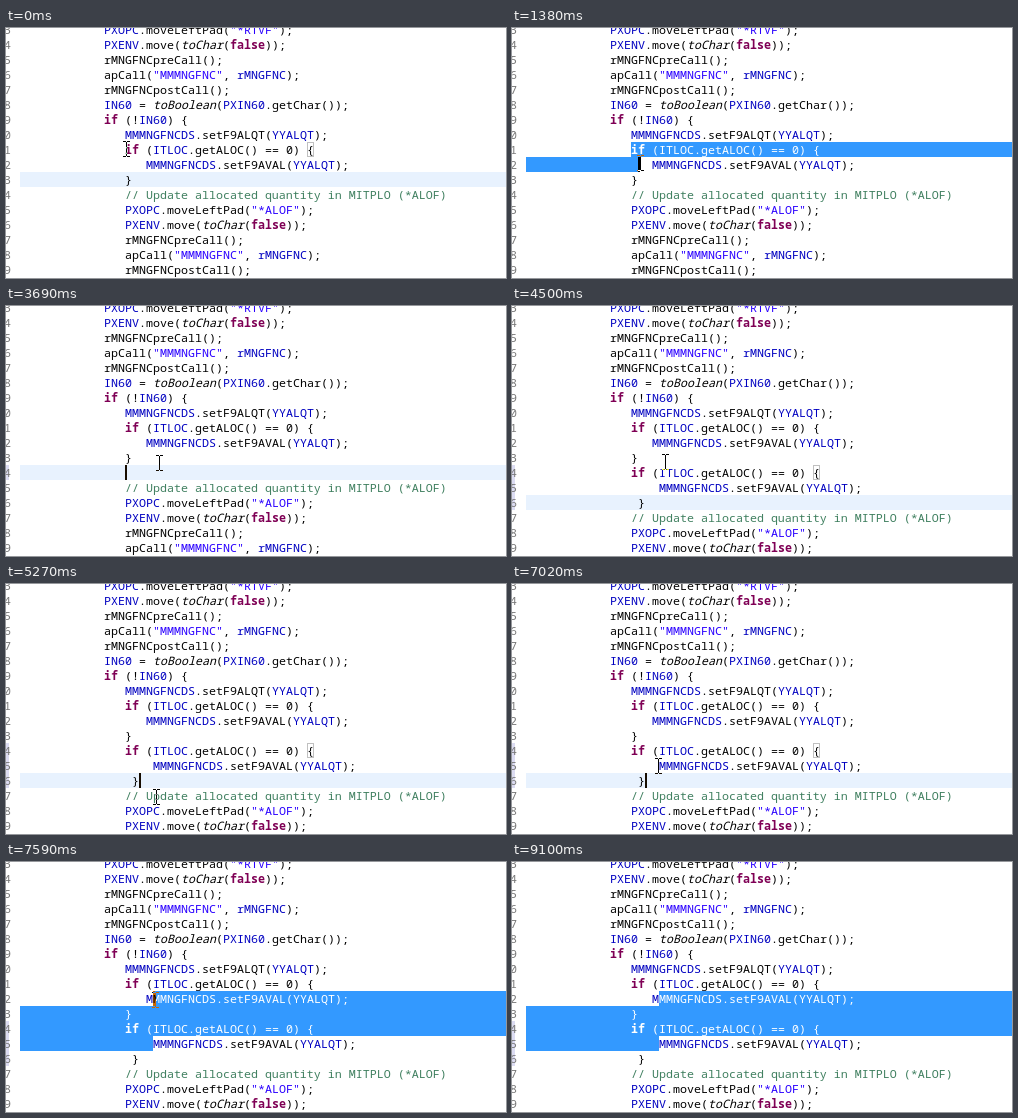
These frames come from a looping animation (500 px wide and 250 px high, 9.59 s). An HTML page with a canvas:

```html
<!DOCTYPE html>
<html lang="en">
<head>
<meta charset="utf-8">
<title>Code editor</title>
<style>
  html, body { margin: 0; width: 100%; height: 100%; overflow: hidden; background: #fff; }
  canvas { display: block; }
</style>
</head>
<body>
<canvas id="stage" width="500" height="250"></canvas>
<script>
const LOOP = 9590, W = 500, H = 250;
const CELL = 7, ROW = 15, TOP = -6, LEFT = 14, BASE = 12;
const ctx = document.getElementById('stage').getContext('2d', { alpha: false });

const pad = (n, s) => ' '.repeat(n) + s;
const move = [pad(15, 'PXENV.move(toChar(false));'), pad(15, 'rMNGFNCpreCall();'),
  pad(15, 'apCall("MMMNGFNC", rMNGFNC);'), pad(15, 'rMNGFNCpostCall();')];
const test = pad(15, 'if (ITLOC.getALOC() == 0) {');
const setAval = 'MMMNGFNCDS.setF9AVAL(YYALQT);';
const head = [
  pad(12, 'PXOPC.moveLeftPad("*RTVF");'),
  ...move.map(s => s.slice(3)),
  pad(12, 'IN60 = toBoolean(PXIN60.getChar());'),
  pad(12, 'if (!IN60) {'),
  pad(15, 'MMMNGFNCDS.setF9ALQT(YYALQT);'),
  test, pad(18, setAval), pad(15, '}')
];
const tail = [
  pad(15, '// Update allocated quantity in MITPLO (*ALOF)'),
  pad(15, 'PXOPC.moveLeftPad("*ALOF");'),
  ...move
];
const pasted = [test, pad(19, setAval), pad(16, '}')];

// Pointer runs: start, end, number of steps, then [share, x, y] points
const runs = [
  [1180, 1510, 6, [[0, 120, 121], [1 / 6, 120, 121], [4 / 6, 128, 135], [1, 140, 158]]],
  [1680, 1680, 1, [[1, 140, 159]]],
  [2420, 2480, 2, [[0, 140, 159], [1, 150, 159]]],
  [2720, 2840, 3, [[0, 150, 159], [1, 151, 158]]],
  [3020, 3140, 2, [[0, 151, 158], [1, 153, 157]]],
  [4500, 4500, 1, [[1, 153, 156]]],
  [4740, 5680, 16, [[0, 153, 156], [.25, 332, 188], [.5625, 150, 213], [.75, 150, 213], [1, 154, 205]]],
  [5740, 6150, 8, [[0, 154, 205], [1, 145, 187]]],
  [6460, 6520, 2, [[0, 145, 187], [1, 145, 184]]],
  [6700, 6700, 1, [[1, 146, 182]]],
  [7250, 7760, 10, [[0, 146, 182], [.7, 149, 138], [1, 150, 132]]],
  [8070, 8790, 10, [[0, 150, 132], [.6, 386, 190], [1, 386, 262]]]
];

// Caret switches: time, visible
const blinks = [[0, 0], [1180, 1], [1990, 0], [2480, 1], [3020, 0], [3510, 1], [4500, 0],
  [4990, 1], [5500, 0], [6010, 1], [6520, 0], [7020, 1], [8080, 0], [8590, 1], [9100, 0]];

const latest = (list, t) => list.filter(e => e[0] <= t).pop();

function along(points, u) {
  const i = points.findIndex(p => p[0] >= u - 1e-6);
  const b = points[i], a = points[Math.max(0, i - 1)];
  const f = b[0] > a[0] ? (u - a[0]) / (b[0] - a[0]) : 1;
  return { x: Math.round(a[1] + (b[1] - a[1]) * f), y: Math.round(a[2] + (b[2] - a[2]) * f) };
}

function pointer(t) {
  const run = latest(runs, t);
  if (!run) return { x: 120, y: 121 };
  const [start, end, n, points] = run;
  const k = end > start ? Math.floor((t - start) / (end - start) * (n - 1) + .01) : 0;
  return along(points, Math.min(1, (k + 1) / n));
}

// Text position nearest to the pointer
function hit(lines, p) {
  const row = Math.floor((p.y - TOP) / ROW);
  return { row, col: Math.min(lines[row].length, Math.round((p.x - LEFT) / CELL)) };
}

function stateAt(t) {
  const added = t < 3690 ? [] : t < 3940 ? [pad(15, '')] : pasted;
  const lines = [...head, ...added, ...tail];
  const s = { lines, added: added.length, brace: -1, anchor: null };
  if (t >= 1180 && t < 2720) {
    s.anchor = { row: 8, col: 15 };
    s.caret = hit(lines, pointer(Math.min(t, 1510)));
  } else if (t >= 7070) {
    s.anchor = { row: 12, col: 19 };
    s.caret = hit(lines, pointer(Math.min(t, 7760)));
  } else if (t < 3690) {
    s.caret = { row: 10, col: 16 };
    s.brace = 8;
  } else if (t < 3940) {
    s.caret = { row: 11, col: 15 };
  } else {
    s.caret = { row: 13, col: 17 };
    s.brace = 11;
  }
  return s;
}

const token = /(\/\/.*)|("[^"]*")|\b(if|false)\b|\b(toChar|toBoolean)\b|\b([A-Z][A-Z0-9]{3,}|rMNGFNC)\b|[^\s\w"]+|\w+/g;
const colours = [, '#3f7f5f', '#2a00ff', '#7f0055', '#000', '#0000c0'];
const font = style => style + ' 11.667px "Noto Sans Mono", "DejaVu Sans Mono", monospace';
const xOf = col => LEFT + col * CELL;
const yOf = row => TOP + row * ROW;

function rect(colour, x, y, w, h) {
  ctx.fillStyle = colour;
  ctx.fillRect(x, y, w, h);
}

function drawText(lines, colour) {
  lines.forEach((line, row) => {
    for (const m of line.matchAll(token)) {
      const kind = [1, 2, 3, 4, 5].find(i => m[i]) || 4;
      ctx.font = font(m[3] ? 'bold' : m[4] ? 'italic' : 'normal');
      ctx.fillStyle = colour || colours[kind];
      ctx.fillText(m[0], xOf(m.index), yOf(row) + BASE);
    }
  });
}

function drawGutter(added) {
  if (added) rect('#dcdcf2', 0, yOf(11), 3, added * ROW);
  ctx.font = font('normal');
  ctx.fillStyle = '#787878';
  for (let row = 0; row < 17; row++) ctx.fillText((row + 3) % 10, -2, yOf(row) + BASE);
}

function drawSelection(lines, a, b) {
  if (a.row > b.row || (a.row === b.row && a.col > b.col)) [a, b] = [b, a];
  ctx.save();
  ctx.beginPath();
  for (let row = a.row; row <= b.row; row++) {
    const x = row === a.row ? xOf(a.col) : LEFT;
    const end = row === b.row ? xOf(b.col) : W;
    ctx.rect(x, yOf(row), end - x, ROW);
  }
  ctx.clip();
  rect('#3399ff', 0, 0, W, H);
  drawText(lines, '#fff');
  ctx.restore();
}

function drawPointer({ x, y }) {
  for (const top of [y - 8, y + 7]) {
    rect('#fff', x - 3, top, 3, 1);
    rect('#fff', x + 1, top, 3, 1);
  }
  rect('#fff', x, y - 7, 1, 14);
}

function draw(t) {
  const { lines, added, brace, anchor, caret } = stateAt(t);
  const selected = anchor && (anchor.row !== caret.row || anchor.col !== caret.col);
  rect('#fff', 0, 0, W, H);
  if (!selected) rect('#e8f2fe', LEFT, yOf(caret.row), W - LEFT, ROW);
  drawGutter(added);
  ctx.save();
  ctx.beginPath();
  ctx.rect(0, 0, W, 249);
  ctx.clip();
  drawText(lines);
  ctx.restore();
  if (brace >= 0) {
    ctx.strokeStyle = '#c0c0c0';
    ctx.lineWidth = 1;
    ctx.strokeRect(xOf(41) + .5, yOf(brace) + .5, CELL - 1, ROW - 1);
  }
  if (selected) drawSelection(lines, anchor, caret);

  // Caret and pointer invert what lies below
  ctx.globalCompositeOperation = 'difference';
  if (latest(blinks, t)[1]) rect('#fff', xOf(caret.col), yOf(caret.row), 2, ROW);
  drawPointer(pointer(t));
  ctx.globalCompositeOperation = 'source-over';
}

const begin = performance.now();
function tick() {
  draw((performance.now() - begin) % LOOP);
  requestAnimationFrame(tick);
}
tick();
</script>
</body>
</html>
```
